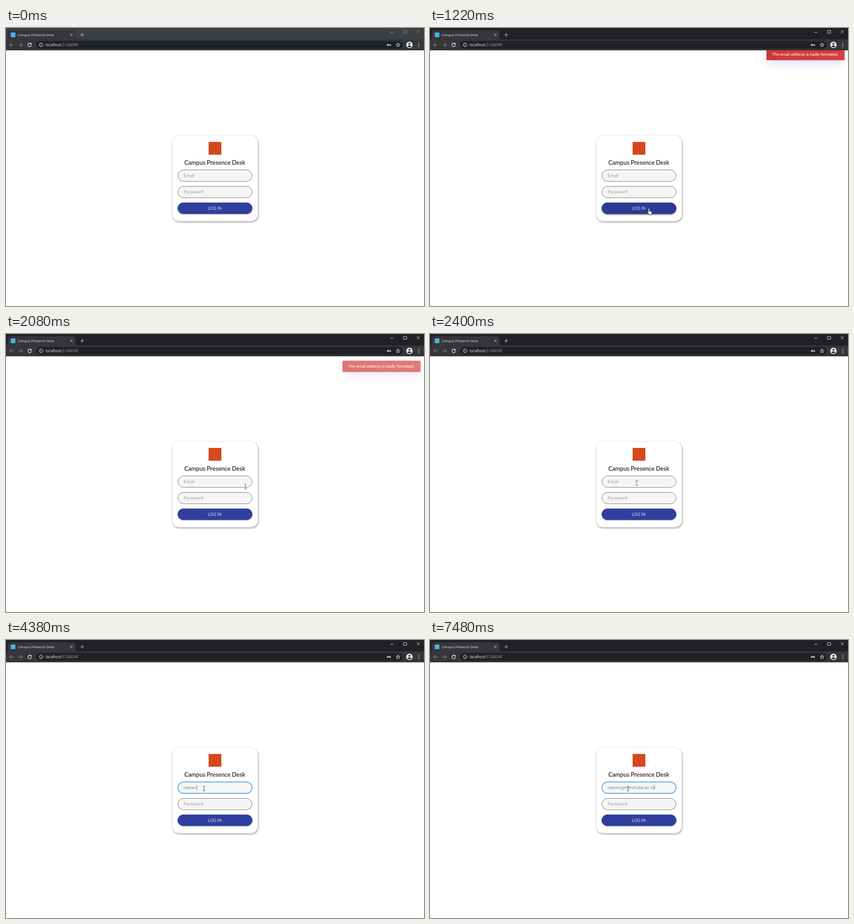
Animation, 918 px wide and 610 px high, one loop 7990 ms. Source, as an HTML page:

```html
<!DOCTYPE html>
<html lang="en">
<head>
<meta charset="utf-8">
<title>Campus Presence Desk</title>
<style>
html, body { margin: 0; width: 100%; height: 100%; overflow: hidden; background: #fff; }
svg { display: block; width: 918px; height: 610px; }
text { white-space: pre; }
.ui { font-family: "Open Sans", "Noto Sans", sans-serif; }
.app { font-family: Lato, sans-serif; }
.hint { font-size: 10.5px; font-weight: 300; fill: #5f5f5f; }
.line { fill: none; stroke-linecap: round; stroke-linejoin: round; }
#card { filter: drop-shadow(1.5px 2px 2px rgba(0,0,0,.34)) drop-shadow(0 0 1px rgba(0,0,0,.12)); }
#button { filter: drop-shadow(0 1px 1px rgba(0,0,0,.35)); }
</style>
</head>
<body>
<svg viewBox="0 0 918 610">
  <defs>
    <linearGradient id="red"><stop stop-color="#c71b1b"/><stop offset="1" stop-color="#d32525"/></linearGradient>
    <filter id="glow" x="-30%" y="-200%" width="160%" height="500%"><feGaussianBlur stdDeviation="11"/></filter>
    <filter id="soft" x="-10%" y="-50%" width="120%" height="200%"><feGaussianBlur stdDeviation="1.8"/></filter>
    <clipPath id="pill"><rect x="377" y="383" width="164" height="25" rx="12.5"/></clipPath>
  </defs>
  <rect width="918" height="610" fill="#fff"/>

  <g class="app">
    <rect id="card" x="365" y="236" width="188" height="188" rx="15" fill="#fff"/>
    <rect x="445" y="250" width="28" height="28" fill="#d5481c"/>
    <text x="458.5" y="300" text-anchor="middle" font-size="13" font-weight="500" fill="#151515">Campus Presence Desk</text>
    <rect id="email" x="377.6" y="311.5" width="162.8" height="25" rx="12.5" fill="#f5f5f5"/>
    <rect x="377.6" y="347.5" width="162.8" height="25" rx="12.5" fill="#f5f5f5" stroke="#555" stroke-width=".8"/>
    <text class="hint" id="typed" x="390" y="327.3"></text>
    <rect id="caret" y="318" width="1" height="11.5" fill="#2196f3"/>
    <text class="hint" x="390" y="363.2">Password</text>
    <rect id="lift" x="378" y="386" width="162" height="24" rx="12" fill="#000" opacity=".3" filter="url(#soft)"/>
    <rect id="button" x="377" y="383" width="164" height="25" rx="12.5" fill="#303f9f"/>
    <circle id="ripple" cx="481" cy="396" clip-path="url(#pill)" fill="#000"/>
    <text x="458.5" y="398.6" text-anchor="middle" font-size="9.2" fill="#dfe2f3">LOG IN</text>
  </g>

  <g id="toast">
    <rect x="741.5" y="67" width="166.5" height="20" fill="#4d60e8" opacity=".3" filter="url(#glow)"/>
    <rect x="739.5" y="60.5" width="170.5" height="23.5" opacity=".13" filter="url(#soft)"/>
    <rect x="739" y="58.4" width="171.5" height="24.9" rx="1.2" fill="url(#red)"/>
    <text x="751.5" y="74.1" font-family="Liberation Sans, Arial, sans-serif" font-size="8.75" fill="#fff">The email address is badly formatted.</text>
  </g>

  <g class="ui">
    <rect id="bar" width="918" height="26"/>
    <path d="M0 25H0Q4 25 4 21V10Q4 5 9 5H148Q153 5 153 10V21Q153 25 157 25H918V49H0Z" fill="#35363a"/>
    <rect x="10.5" y="10" width="10" height="10" fill="#48b6ee"/>
    <text x="25.5" y="17.7" font-size="7.4" fill="#e4e6e9">Campus Presence Desk</text>
    <g class="line" stroke="#dfe1e5" stroke-width="1">
      <path d="M141.2 12.7l4.6 4.6m0-4.6l-4.6 4.6"/>
      <path d="M163.5 15h8m-4-4v8" stroke="#c4c7cb"/>
      <path d="M16.3 37H8.2m3.8-3.9L8.1 37l3.9 3.9M27.7 37h8.1M32 33.1l3.9 3.9-3.9 3.9" stroke="#85888c" stroke-width="1.1"/>
      <path d="M55.2 34.9A3.8 3.8 0 1 0 55.7 38.2" stroke="#f1f3f4" stroke-width="1.3"/>
    </g>
    <path d="M56.4 32.7v3.6h-3.6z" fill="#f1f3f4"/>
    <rect x="66" y="28.4" width="806" height="17.2" rx="8.6" fill="#202124"/>
    <g class="line" stroke="#e8eaed">
      <circle cx="77" cy="37" r="4"/>
      <path d="M77 36.8v2M77 34.9v.1"/>
      <circle cx="838.8" cy="37" r="1.6" stroke-width="1.3"/>
      <path d="M840.6 37h4.2v1.4m-1.7-1.3v1" stroke-width="1.3"/>
      <path id="star"/>
    </g>
    <text x="87" y="40" font-size="8.3" fill="#f1f3f4">localhost<tspan fill="#9aa0a6">:51640/#/</tspan></text>
    <circle cx="886" cy="37" r="7" fill="#f1f3f4"/>
    <circle cx="886" cy="34.6" r="2.2" fill="#35363a"/>
    <path d="M881.7 40.4Q882.6 38 886 38t4.3 2.4Q888.6 42.5 886 42.5t-4.3-2.1" fill="#35363a"/>
    <path d="M906.5 33.6v0m0 3.4v0m0 3.4v0" class="line" stroke="#f1f3f4" stroke-width="1.8"/>
    <path id="controls" class="line" d="M844.5 9.5h6M873.5 5.5h6.4v6h-6.4zM902.5 5.3l6 6m0-6l-6 6" stroke-width=".9"/>
  </g>

  <g id="pointer" stroke-linejoin="round">
    <path id="arrow" d="M0 0V11.4L2.7 9 4.4 12.8 6.1 12 4.5 8.4H8Z" fill="#fff" stroke="#222" stroke-width=".8"/>
    <path id="hand" d="M-1.4 7.4V.7Q-1.3-.5-.2-.5T1 .7V4.8L4.8 5.5Q6.7 5.9 6.5 7.8L5.6 11.6V14H.2V12.4L-3.5 8.2Q-3.9 7.1-2.8 6.7Z M2.8 5.3V8M4.7 5.8V8.2M1 4.8V7.4" fill="#fff" stroke="#222" stroke-width=".8"/>
    <path id="beam" d="M-2.7-5H-.7L0-4.5.7-5H2.7M0-4.5V4.5M-2.7 5H-.7L0 4.5.7 5H2.7" fill="none" stroke="#444" stroke-width=".9"/>
  </g>
</svg>
<script>
const LOOP = 7990;
const ADDRESS = "owner@norvindal.ac.id";
const keyTimes = [3940, 4010, 4130, 4190, 4380, 4930, 5390, 5580, 5630, 5870, 5950,
  6130, 6130, 6370, 6460, 6650, 6840, 7020, 7110, 7390, 7480];
const caretSpans = [[2870, 3370], [3870, 4890], [4930, LOOP]];
const path = [
  [170, 878, 604], [300, 785, 556], [420, 650, 488], [540, 540, 430], [650, 492, 404], [750, 481, 396],
  [1680, 481, 396], [1850, 505, 375], [2080, 526, 335], [2250, 500, 329], [2450, 439, 326],
  [2490, 432, 321], [2580, 430, 323], [2670, 435, 326]
];

const $ = id => document.getElementById(id);
const set = (id, attrs) => { for (const k in attrs) $(id).setAttribute(k, attrs[k]); };
const show = (id, on) => set(id, { visibility: on ? "visible" : "hidden" });
const part = (t, from, span) => Math.min(1, Math.max(0, (t - from) / span));
const mix = (a, b, p) => a + (b - a) * p;
const easeOut = p => 1 - (1 - p) ** 3;

set("star", { d: "M" + Array.from({ length: 10 }, (_, i) => {
  const a = i * Math.PI / 5, r = i % 2 ? 1.9 : 4.5;
  return [861 + r * Math.sin(a), 37.3 - r * Math.cos(a)].map(v => v.toFixed(2));
}).join("L") + "Z" });

function place(t) {
  const i = path.findIndex(p => p[0] > t);
  if (i < 0) return path[path.length - 1].slice(1);
  if (!i) return null;
  const [a, b] = [path[i - 1], path[i]];
  const p = part(t, a[0], b[0] - a[0]);
  return [mix(a[1], b[1], p), mix(a[2], b[2], p)];
}

function drawPointer(t) {
  const pos = place(t);
  let kind = "";
  if (pos) {
    const [x, y] = pos;
    const within = (top, bottom) => x > 377 && x < 541 && y > top && y < bottom;
    kind = within(383, 408) ? "hand" : within(311, 337) || within(347, 373) ? "beam" : "arrow";
    set("pointer", { transform: `translate(${x} ${y})` });
  }
  for (const id of ["arrow", "hand", "beam"]) show(id, id === kind);
  const hover = kind === "hand";
  set("button", { fill: hover ? "#2d3b97" : "#303f9f" });
  show("lift", hover);
}

function drawField(t) {
  const focus = part(t, 2800, 150);
  const rgb = [[85, 33], [85, 150], [85, 243]].map(([a, b]) => Math.round(mix(a, b, focus)));
  set("email", { stroke: `rgb(${rgb})`, "stroke-width": mix(.8, 1.4, focus) });
  const count = keyTimes.filter(k => k <= t).length;
  const typed = $("typed");
  typed.textContent = count ? ADDRESS.slice(0, count) : "Email";
  typed.style.fill = count ? "#303030" : "";
  set("caret", { x: 390 + (count ? typed.getComputedTextLength() : 0) });
  show("caret", caretSpans.some(([a, b]) => t >= a && t < b));
}

function drawToast(t) {
  const enter = easeOut(part(t, 1020, 400));
  const leave = easeOut(part(t, 2020, 400));
  set("toast", { transform: `translate(0 ${-103 * (1 - enter)})`, opacity: enter * (1 - leave) });
}

function draw(t) {
  const active = t >= 940;
  set("bar", { fill: active ? "#202124" : "#3c4043" });
  set("controls", { stroke: active ? "#f1f3f4" : "#969a9e" });
  set("ripple", {
    r: 110 * easeOut(part(t, 940, 280)),
    opacity: .07 * part(t, 940, 60) * (1 - part(t, 1060, 240))
  });
  drawPointer(t);
  drawField(t);
  drawToast(t);
}

const start = performance.now();
function tick() {
  draw((performance.now() - start) % LOOP);
  requestAnimationFrame(tick);
}
tick();
</script>
</body>
</html>
```
